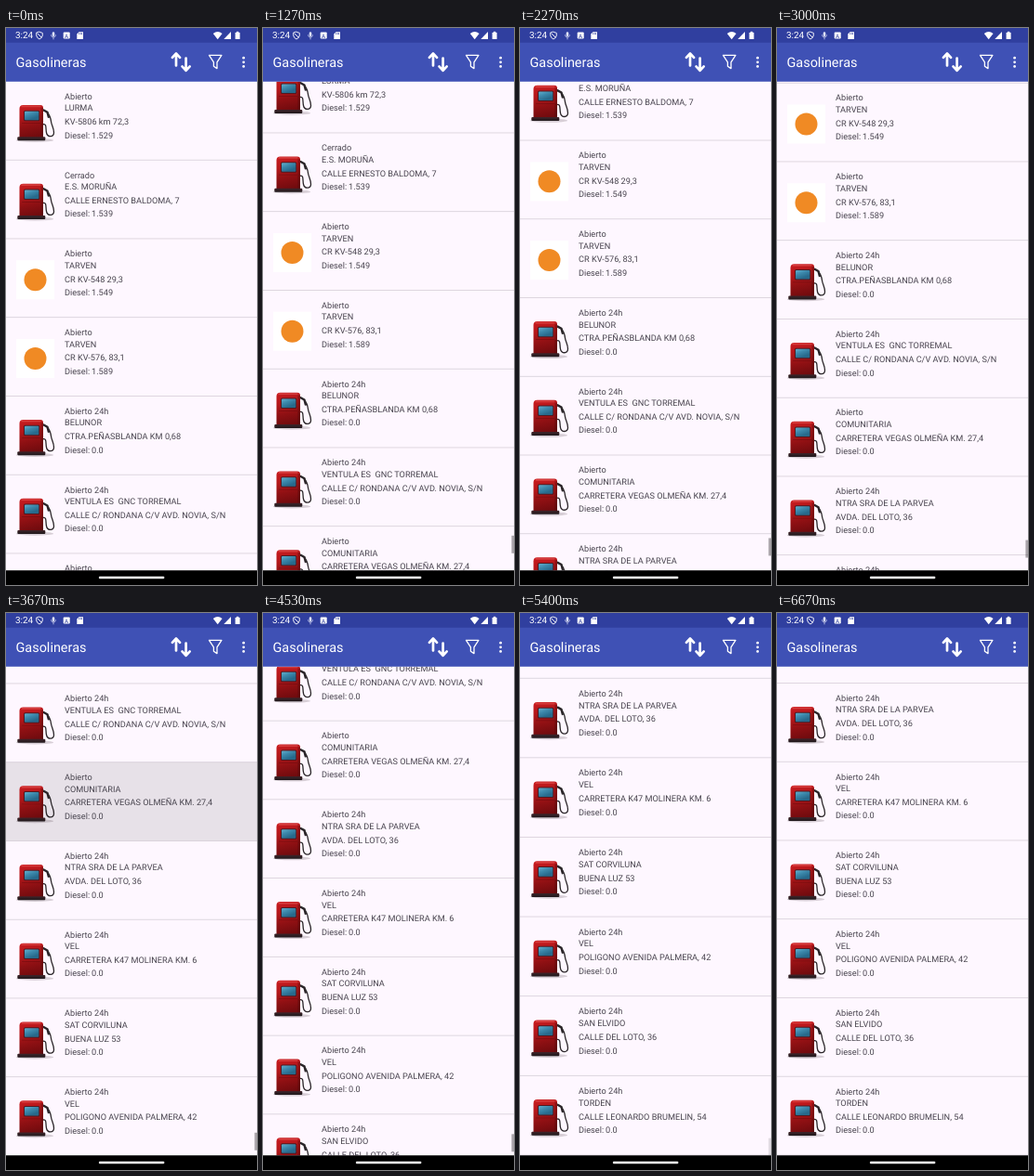
Recreate the animation shown at these times as an HTML page with a canvas. Size 270 px wide and 600 px high, loop 6740 ms.

```html
<!DOCTYPE html>
<html lang="es">
<head>
<meta charset="utf-8">
<title>Gasolineras</title>
<style>
  html, body { margin: 0; width: 100%; height: 100%; overflow: hidden; background: #fef7ff; }
  canvas { display: block; width: 270px; height: 600px; }
</style>
</head>
<body>
<canvas id="stage"></canvas>
<script>
const W = 270, H = 600, LOOP = 6740;
const TOP = 57.75, BOTTOM = 584.25, PITCH = 84.75;
const PRESSED_ROW = 6;
const FONT = 'Roboto, sans-serif';

const OPEN = 'Abierto', DAY = 'Abierto 24h';
// state, name, address, price, has a brand tile
const rows = [
  [OPEN, 'LURMA', 'KV-5806 km 72,3', '1.529'],
  ['Cerrado', 'E.S. MORUÑA', 'CALLE ERNESTO BALDOMA, 7', '1.539'],
  [OPEN, 'TARVEN', 'CR KV-548 29,3', '1.549', true],
  [OPEN, 'TARVEN', 'CR KV-576, 83,1', '1.589', true],
  [DAY, 'BELUNOR', 'CTRA.PEÑASBLANDA KM 0,68', '0.0'],
  [DAY, 'VENTULA ES  GNC TORREMAL', 'CALLE C/ RONDANA C/V AVD. NOVIA, S/N', '0.0'],
  [OPEN, 'COMUNITARIA', 'CARRETERA VEGAS OLMEÑA KM. 27,4', '0.0'],
  [DAY, 'NTRA SRA DE LA PARVEA', 'AVDA. DEL LOTO, 36', '0.0'],
  [DAY, 'VEL', 'CARRETERA K47 MOLINERA KM. 6', '0.0'],
  [DAY, 'SAT CORVILUNA', 'BUENA LUZ 53', '0.0'],
  [DAY, 'VEL', 'POLIGONO AVENIDA PALMERA, 42', '0.0'],
  [DAY, 'SAN ELVIDO', 'CALLE DEL LOTO, 36', '0.0'],
  [DAY, 'TORDEN', 'CALLE LEONARDO BRUMELIN, 54', '0.0']
];
const MAX_SCROLL = rows.length * PITCH - (BOTTOM - TOP);

const canvas = document.getElementById('stage');
const ctx = canvas.getContext('2d');
const dpr = window.devicePixelRatio || 1;
canvas.width = W * dpr;
canvas.height = H * dpr;
ctx.textRendering = 'geometricPrecision';

const clamp = v => Math.max(0, Math.min(1, v));
const linear = p => p;
const smooth = p => p * p * (3 - 2 * p);
const easeOut = p => 1 - (1 - p) * (1 - p);

// time, value, easing towards that value
const scrollKeys = [
  [0, 0], [850, 0, linear], [1800, 66, linear], [3000, 167.75, linear],
  [3580, 405.25, smooth], [3800, 405.25, linear], [4530, 449.25, smooth],
  [4950, MAX_SCROLL, easeOut], [LOOP, MAX_SCROLL, linear]
];
const stretchKeys = [
  [0, 1], [4900, 1, linear], [5130, 1.014, easeOut],
  [5400, 1.0103, linear], [5800, 1, easeOut], [LOOP, 1, linear]
];

function valueAt(keys, t) {
  const i = keys.findIndex(k => k[0] > t);
  const [t0, v0] = keys[i - 1], [t1, v1, ease] = keys[i];
  return v0 + (v1 - v0) * ease((t - t0) / (t1 - t0));
}

function rect(x, y, w, h, color) {
  ctx.fillStyle = color;
  ctx.fillRect(x, y, w, h);
}

function round(x, y, w, h, r, color) {
  ctx.fillStyle = color;
  ctx.beginPath();
  ctx.roundRect(x, y, w, h, r);
  ctx.fill();
}

function disc(x, y, r, color) {
  ctx.fillStyle = color;
  ctx.beginPath();
  ctx.arc(x, y, r, 0, Math.PI * 2);
  ctx.fill();
}

function fillPath(d, color) {
  ctx.fillStyle = color;
  ctx.fill(new Path2D(d));
}

function strokePath(d, color, width) {
  ctx.strokeStyle = color;
  ctx.lineWidth = width;
  ctx.lineCap = ctx.lineJoin = 'round';
  ctx.stroke(new Path2D(d));
}

function text(s, x, y, size, color) {
  ctx.font = `${size}px ${FONT}`;
  ctx.fillStyle = color;
  ctx.fillText(s, x, y);
}

function shade(x0, y0, x1, y1, ...colors) {
  const g = ctx.createLinearGradient(x0, y0, x1, y1);
  colors.forEach((c, i) => g.addColorStop(i / (colors.length - 1), c));
  return g;
}

function drawPump(y) {
  ctx.save();
  ctx.translate(0, y);
  ctx.fillStyle = 'rgba(60,40,50,.2)';
  ctx.beginPath();
  ctx.ellipse(31, 63.2, 20, 2, 0, 0, Math.PI * 2);
  ctx.fill();
  strokePath('M40 46 C44 45 42.5 51 43.5 55 C44.5 60 51.5 60.5 51.5 55 C51.5 50 49 47 48.5 43 C48 39 47 36 44.5 33.5', '#2b2629', 1.3);
  strokePath('M40.5 30.8 L44.5 33 L45.8 38', '#2b2629', 2.4);
  round(14.5, 25.2, 25.5, 36, [4, 3, 1, 1], shade(18, 25, 26, 61, '#c91c20', '#b3171a', '#8e1013', '#700b0e'));
  rect(37.5, 28, 2.5, 32, 'rgba(60,0,5,.35)');
  round(16.5, 25.8, 21, 1.8, 0.9, 'rgba(245,120,115,.35)');
  round(19, 31, 17.3, 11.5, 1.5, '#521920');
  round(20, 32, 15.3, 9.5, 1, shade(20, 32, 24, 42, '#62b0cf', '#3c88ab', '#276a8c'));
  rect(17, 44.5, 20, 0.7, 'rgba(70,0,5,.4)');
  round(12.3, 59.5, 30, 4, 1, shade(0, 59.5, 0, 63.5, '#40242a', '#1f191c'));
  ctx.restore();
}

function drawBrandTile(y) {
  rect(11, y + 23, 41, 42, '#ffffff');
  disc(31.5, y + 44, 12, '#f08a24');
}

function drawRow([state, name, address, price, brand], y) {
  const ink = '#49454f', size = 9.19;
  (brand ? drawBrandTile : drawPump)(y);
  text(state, 63, y + 19, size, ink);
  text(name, 63, y + 31.7, size, ink);
  text(address, 63, y + 46.4, size, ink);
  text('Diesel:', 63, y + 60.9, size, ink);
  text(price, 92, y + 60.9, size, ink);
  rect(0, y + PITCH - 0.7, W, 0.8, '#d6cfd8');
}

function drawList(t) {
  const scroll = valueAt(scrollKeys, t), stretch = valueAt(stretchKeys, t);
  ctx.save();
  ctx.beginPath();
  ctx.rect(0, TOP, W, BOTTOM - TOP);
  ctx.clip();

  ctx.save();
  ctx.translate(0, BOTTOM);
  ctx.scale(1, stretch);
  ctx.translate(0, -BOTTOM);
  rows.forEach((row, i) => {
    const y = TOP + i * PITCH - scroll;
    if (y < TOP - PITCH - 8 || y > BOTTOM) return;
    if (i === PRESSED_ROW) {
      const press = clamp((t - 3580) / 60) * clamp((3960 - t) / 160);
      rect(0, y, W, PITCH, `rgba(0,0,0,${0.09 * press})`);
    }
    drawRow(row, y);
  });
  ctx.restore();

  const bar = t < 850 ? 0 : clamp((5480 - t) / 230);
  rect(267.4, 545.8 + scroll * 0.0345, 2.6, 19, `rgba(0,0,0,${0.34 * bar})`);
  ctx.restore();
}

function drawStatusBar() {
  const white = '#ffffff';
  rect(0, 0, W, 15.75, '#303f9f');
  text('3:24', 10, 11.4, 9.9, white);
  strokePath('M36 4.2 L39.3 5.4 V8 Q39 10.8 36 12 Q33 10.8 32.7 8 V5.4 Z M34 6 L38 10', white, 0.9);
  round(49.7, 4.2, 2.6, 4.8, 1.3, '#dfe3f7');
  strokePath('M48.5 7.7 Q48.7 10 51 10 Q53.3 10 53.5 7.7 M51 10 V12', '#dfe3f7', 0.7);
  round(61.7, 4.6, 7, 7, 1, white);
  text('A', 63.1, 10.5, 6.3, '#303f9f');
  fillPath('M78.5 4.3 H83 V12 H76.3 V6.5 Z', white);
  for (let i = 0; i < 3; i++) rect(78.4 + i * 1.5, 5.3, 0.7, 1.7, '#303f9f');
  fillPath('M222.8 6 Q227.7 2.2 232.6 6 L227.7 12.2 Z', white);
  fillPath('M242 4 V12 H234.3 Z', white);
  round(246.6, 4.7, 5, 7.4, 0.7, white);
  rect(248, 3.8, 2.2, 1.2, white);
}

function drawToolbar() {
  const white = '#ffffff';
  rect(0, 15, W, TOP - 15, '#3f51b5');
  text('Gasolineras', 10.5, 41.9, 14.44, white);
  strokePath('M183 40.5 V28 M178.9 31.8 L183 27.4 L187.1 31.8', white, 2.7);
  strokePath('M193.6 32.5 V45 M189.5 41.4 L193.6 45.8 L197.7 41.4', white, 2.7);
  strokePath('M218.5 29.4 H231.9 L227 36.8 V43.6 L223.4 41.2 V36.8 Z', white, 1.3);
  for (let i = 0; i < 3; i++) disc(255.6, 32.2 + i * 4.6, 1.35, white);
}

function draw(t) {
  ctx.setTransform(dpr, 0, 0, dpr, 0, 0);
  rect(0, 0, W, H, '#fef7ff');
  drawList(t);
  drawToolbar();
  drawStatusBar();
  rect(0, BOTTOM, W, H - BOTTOM, '#000000');
  round(99.8, 590.8, 70.6, 2.4, 1.2, '#ffffff');
}

const start = performance.now();
function tick() {
  draw((performance.now() - start) % LOOP);
  requestAnimationFrame(tick);
}
tick();
</script>
</body>
</html>
```
